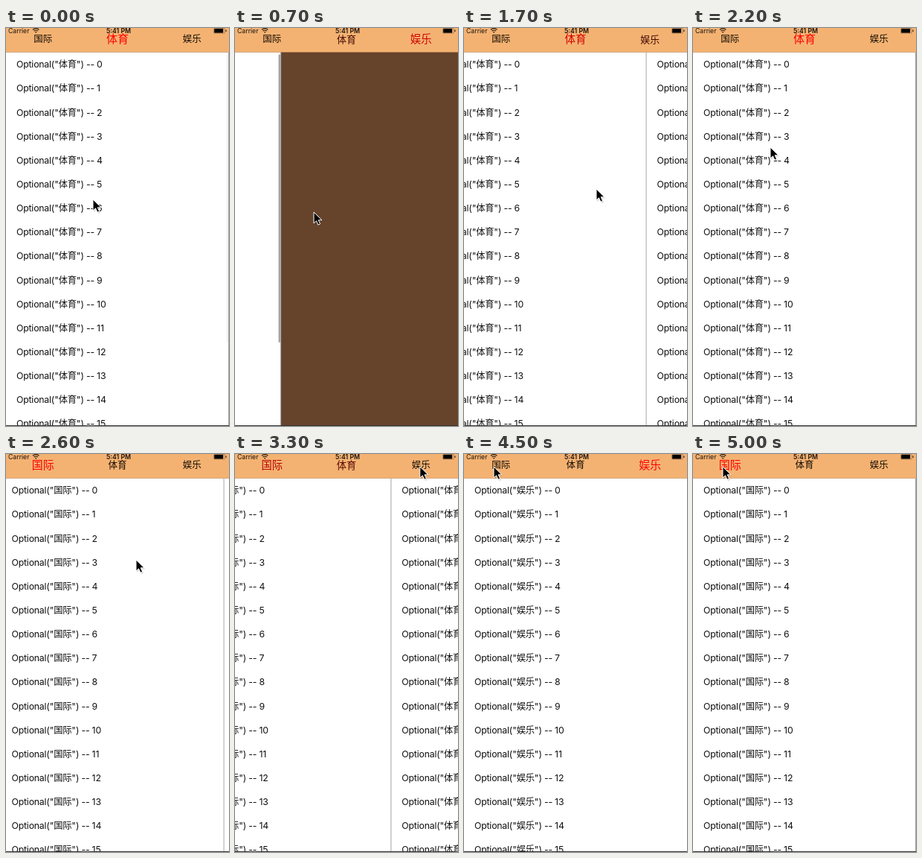
Animation of 300 by 534 pixels, one loop 5100 ms. Source, as an HTML page:

```html
<!DOCTYPE html>
<html lang="zh-CN">
<head>
<meta charset="utf-8">
<title>Paged lists</title>
<style>
html, body { margin: 0; width: 100%; height: 100%; overflow: hidden; background: #fff; }
svg { display: block; width: 300px; height: 534px; }
text { font-family: Inter, "Noto Sans CJK SC", "Noto Sans CJK", sans-serif; }
.row { font-size: 12.3px; fill: #111; letter-spacing: -0.2px; white-space: pre; }
.tab { font-size: 12.5px; text-anchor: middle; }
.status { font-size: 8.7px; fill: #1c140d; }
</style>
</head>
<body>
<svg id="stage" viewBox="0 0 300 534">
  <rect width="300" height="534" fill="#66432b"/>
  <g id="pages"></g>
  <rect y="533" width="300" height="1" fill="#333"/>
  <rect width="300" height="32.5" fill="#f4b272"/>
  <text class="status" x="3" y="7">Carrier</text>
  <g fill="none" stroke="#1c140d" stroke-width="1.2">
    <path d="M36 2.3Q40.2 -1.3 44.4 2.3M37.6 4.1Q40.2 1.9 42.8 4.1"/>
    <path d="M39 5.3L40.2 6.7L41.4 5.3Q40.2 4.5 39 5.3Z" fill="#1c140d" stroke="none"/>
  </g>
  <text class="status" x="151.500" y="7" text-anchor="middle" font-weight="600">5:41 PM</text>
  <rect x="279.500" y="0.500" width="15" height="6.500" rx="1" fill="none" stroke="#8a6848" stroke-width=".6"/>
  <rect x="280.200" y="1" width="12" height="5.500" rx=".6" fill="#000"/>
  <rect x="295.500" y="2.500" width="1" height="2.500" fill="#1c140d"/>
  <g id="tabs"></g>
  <g id="cursor">
    <path d="M1 2V17L4.700 13.600L7.200 19L10 17.800L7.600 12.500H12.300Z" fill="#000" opacity=".16"/>
    <path d="M0 0V15L3.500 11.800L5.900 17.200L8.600 16L6.200 10.800H11Z" fill="#000" stroke="#fff" stroke-width="1"/>
  </g>
</svg>
<script>
const LOOP = 5100, STEP = 100, W = 300, TOP = 32.5, ROW = 32.15;
const names = ["国际", "体育", "娱乐"];
const $ = id => document.getElementById(id);

function add(parent, tag, attrs, text) {
  const el = document.createElementNS("http://www.w3.org/2000/svg", tag);
  for (const k in attrs) el.setAttribute(k, attrs[k]);
  if (text) el.textContent = text;
  parent.appendChild(el);
  return el;
}

const pages = names.map((name, i) => {
  const g = add($("pages"), "g", {});
  add(g, "rect", { y: TOP, width: W, height: 502, fill: "#fff" });
  for (let r = 0; r < 16; r++)
    add(g, "text", { class: "row", x: 14, y: 53.2 + r * ROW }, `Optional("${name}") -- ${r}`);
  const bar = add(g, "rect", { x: 296.7, y: 35.5, width: 2, height: 386.5, rx: 1, fill: "#000" });
  if (i < 2) add(g, "rect", { x: 299.2, y: TOP, width: 1, height: 502, fill: "#8c8c8c" });
  return { g, bar };
});
const tabs = names.map(name => add($("tabs"), "text", { class: "tab", y: 4.6 }, name));

// [time, value...] keys
const swipes = [
  [0, 300], [300, 300], [400, 325], [500, 380], [600, 452], [700, 538], [800, 592], [900, 600],
  [1400, 600], [1500, 570], [1600, 470], [1700, 354.5], [1800, 306], [1900, 300],
  [2200, 300], [2300, 270], [2400, 170], [2500, 54.5], [2600, 6.5], [2700, 0]
];
const pointer = [
  [0, 117, 230], [300, 225, 240], [600, 112, 246], [700, 106, 247], [1000, 109, 247],
  [1300, 98, 236], [1700, 178, 216], [1900, 180, 206], [2200, 104, 160], [2500, 172, 144],
  [2600, 175, 142], [2800, 184, 122], [3200, 248, 18], [3700, 252, 13], [3800, 252, 14],
  [3900, 252, 14], [4000, 260, 14], [4100, 266, 15], [4400, 24, 16], [4500, 40, 17], [5100, 40, 17]
];

const clamp = v => Math.max(0, Math.min(1, v));
const ease = v => v * v * (3 - 2 * v);

function at(keys, t) {
  const n = keys.findIndex(k => k[0] > t);
  if (n < 0) return keys[keys.length - 1].slice(1);
  const a = keys[n - 1], b = keys[n], p = (t - a[0]) / (b[0] - a[0]);
  return a.slice(1).map((v, i) => v + (b[i + 1] - v) * p);
}

function scrollAt(t) {
  if (t < 3200) return at(swipes, t)[0];
  if (t < 4600) return 600 * ease(clamp((t - 3200) / 410));
  return 600 * (1 - ease(clamp((t - 4600) / 400)));
}

// Scroll indicator fades in, rests, fades out
const flash = (t, from, to) => 0.42 * Math.min(clamp((t - from) / 150), clamp((to - t) / 300));

function draw(t) {
  const x = scrollAt(t);
  const bars = [0, flash(t, -20, 1100), flash(t, 1050, 1900)];
  pages.forEach(({ g, bar }, i) => {
    g.setAttribute("transform", `translate(${i * W - x} 0)`);
    g.setAttribute("visibility", i < 2 || t >= 900 ? "visible" : "hidden");
    bar.setAttribute("opacity", bars[i]);
  });
  tabs.forEach((tab, i) => {
    const p = clamp(1 - Math.abs(x / W - i));
    tab.setAttribute("transform", `translate(${49.7 + i * 100.3} 14.8) scale(${1 + 0.2 * p})`);
    tab.setAttribute("fill", `rgb(${Math.round(20 + 235 * p)},${Math.round(12 * (1 - p))},0)`);
  });
  $("cursor").setAttribute("transform", `translate(${at(pointer, t).join(" ")})`);
}

function tick() {
  draw(Math.floor(performance.now() % LOOP / STEP) * STEP);
  requestAnimationFrame(tick);
}
tick();
</script>
</body>
</html>
```
